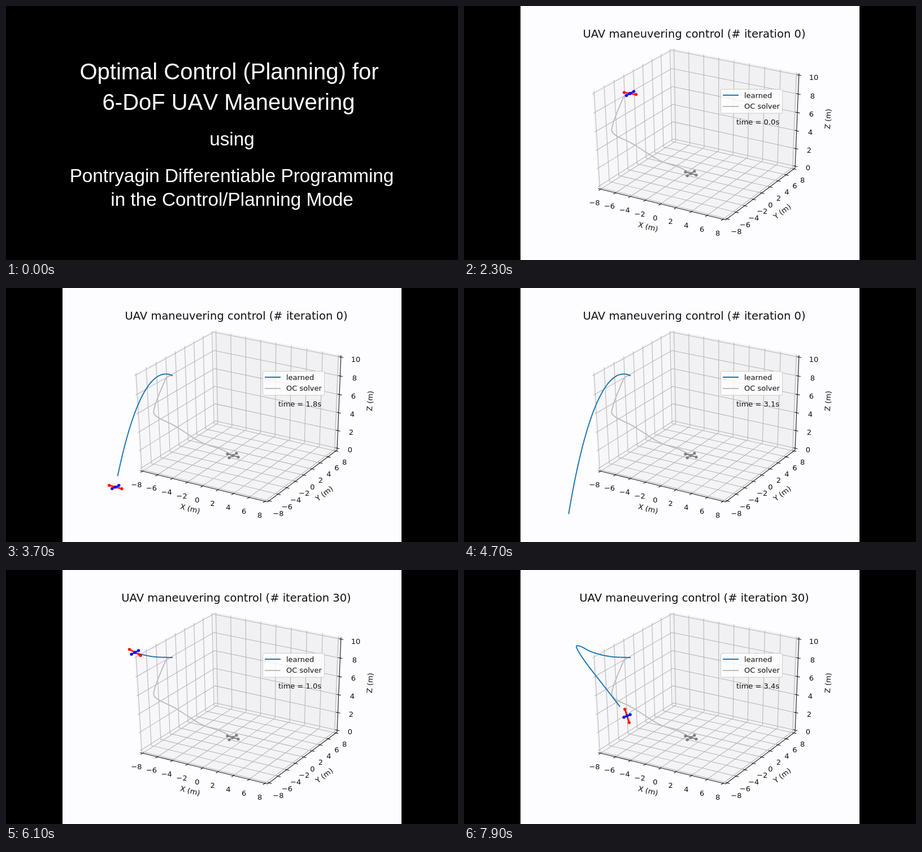
An HTML page for the animation above (8 s loop, 800x450 px).

```html
<!DOCTYPE html>
<html lang="en">
<head>
<meta charset="utf-8">
<title>UAV maneuvering</title>
<style>
  html, body { margin: 0; width: 100%; height: 100%; overflow: hidden; background: #000; }
  svg { display: block; width: 100vw; height: 100vh; }
  .slide { fill: #fff; font: 40px "Liberation Sans", Arial, sans-serif; text-anchor: middle; font-kerning: none; }
  .slide .mid { font-size: 33.3px; }
  .slide .note { font-size: 30px; font-style: italic; }
  .plot { font: 13px "DejaVu Sans", sans-serif; fill: #111; }
  .center { text-anchor: middle; }
  #title { font-size: 19.5px; }
  .grid { stroke: #b4b4b5; stroke-width: 1.04; fill: none; }
  .axis { stroke: #111; stroke-width: 1.04; fill: none; }
  .curve { fill: none; stroke-width: 1.95; stroke-linejoin: round; stroke-linecap: square; }
  .learned { stroke: #1f77b4; }
  .solver { stroke: #bdbdbe; }
  .drone line { stroke-width: 2.8; }
  .goal line { stroke-width: 2; }
</style>
</head>
<body>
<svg viewBox="0 0 800 450">
  <clipPath id="area"><rect x="175" y="54" width="465" height="346.5"/></clipPath>
  <rect width="800" height="450"/>

  <g id="intro" class="slide">
    <text x="395" y="130">Optimal Control (Planning) for</text>
    <text x="394" y="184">6-DoF UAV Maneuvering</text>
    <g class="mid">
      <text x="400" y="247">using</text>
      <text x="399.5" y="312">Pontryagin Differentiable Programming</text>
      <text x="400" y="354">in the Control/Planning Mode</text>
    </g>
  </g>

  <g id="case" class="slide">
    <text x="394.5" y="168.5">Case 1:</text>
    <g class="note">
      <text x="400.5" y="224.5">The policy is parameterized as</text>
      <text x="396.5" y="278.5">Lagrange polynomial of degree <tspan font-weight="bold">N = 5</tspan></text>
    </g>
  </g>

  <g id="plot" class="plot">
    <rect x="100" width="600" height="450" fill="#fdfcfe"/>
    <text id="title" class="center" x="407.5" y="55.5"></text>
    <g id="box"></g>
    <g id="labels" class="center">
      <text transform="translate(326 391) rotate(14)" y="4.7">X (m)</text>
      <text transform="translate(563 364) rotate(-37)" y="4.7">Y (m)</text>
      <text transform="translate(644 200) rotate(-87)" y="4.7">Z (m)</text>
    </g>
    <g clip-path="url(#area)">
      <path id="solver" class="curve solver"/>
      <g id="goal" class="goal"></g>
      <path id="learned" class="curve learned"/>
      <g id="drone" class="drone"></g>
    </g>
    <rect x="454.5" y="147.5" width="109" height="42.5" rx="2.5" fill="#fff" fill-opacity=".8" stroke="#ccc"/>
    <path class="curve learned" d="M459 158H485"/>
    <path class="curve solver" d="M459 178H485"/>
    <text x="496" y="163">learned</text>
    <text x="496" y="182">OC solver</text>
    <text id="clock" x="482" y="210"></text>
  </g>
</svg>
<script>
const $ = id => document.getElementById(id);
const LOOP = 8000, CASE_AT = 500, PLOT_AT = 2300, RETRAINED_AT = 5300;
const STEP = 200, SECONDS_PER_STEP = 0.26, TRAIL_LAG = 0.1;

function add(parent, tag, attrs, text = '') {
  const el = document.createElementNS('http://www.w3.org/2000/svg', tag);
  for (const key in attrs) el.setAttribute(key, attrs[key]);
  el.textContent = text;
  return parent.appendChild(el);
}

const toPath = points => 'M' + points.map(p => p.map(v => v.toFixed(2)).join(' ')).join('L');

// Perspective of the plot box; each coordinate runs from 0 to 1
function project(a, b, c) {
  const w = 1 - .04 * a + .07 * b - .048 * c;
  return [(237.5 + 207 * a + 159.1 * b - 21.3 * c) / w,
          (323.5 + 40.3 * a - 68.2 * b - 178.8 * c) / w];
}

function drawBox() {
  const box = $('box');
  const line = (kind, ...corners) =>
    add(box, 'path', { class: kind, d: toPath(corners.map(c => project(...c))) });
  const pane = (fill, ...corners) =>
    add(box, 'polygon', { fill, points: corners.map(c => project(...c)).join(' ') });
  const label = (value, x, y) =>
    add($('labels'), 'text', { x, y: y + 4.7 }, String(value).replace('-', '\u2212'));

  pane('#f7f6f8', [0, 0, 0], [0, 1, 0], [0, 1, 1], [0, 0, 1]);
  pane('#f1f0f2', [0, 1, 0], [1, 1, 0], [1, 1, 1], [0, 1, 1]);
  pane('#f4f3f5', [0, 0, 0], [1, 0, 0], [1, 1, 0], [0, 1, 0]);

  const ticks = n => Array.from({ length: n + 1 }, (_, i) => .02 + .96 * i / n);
  for (const s of ticks(8)) {
    line('grid', [s, 0, 0], [s, 1, 0], [s, 1, 1]);
    line('grid', [1, s, 0], [0, s, 0], [0, s, 1]);
  }
  for (const s of ticks(5)) line('grid', [0, 0, s], [0, 1, s], [1, 1, s]);

  line('axis', [0, 0, 0], [1, 0, 0], [1, 1, 0], [1, 1, 1]);
  ticks(8).forEach((s, i) => {
    line('axis', [s, .01, 0], [s, -.025, 0]);
    line('axis', [.99, s, 0], [1.02, s, 0]);
    label(2 * i - 8, 231 + 26.4 * i + .11 * i * i, 348 + 6.75 * i);
    label(2 * i - 8, 482 + 15.6 * i - .12 * i * i, 399 - 12.1 * i + .09 * i * i);
  });
  ticks(5).forEach((s, i) => {
    line('axis', [.985, 1, s], [1.018, 1, s]);
    label(2 * i, 609 + 2 * i, 286 - 31 * i - .2 * i * i);
  });
}

// Catmull-Rom curve; u counts key points
function spline(keys, u) {
  const last = keys.length - 1;
  const i = Math.min(Math.floor(u), last - 1), f = u - i;
  const p = keys[i], q = keys[i + 1];
  const before = keys[Math.max(i - 1, 0)], after = keys[Math.min(i + 2, last)];
  return p.map((v, k) => {
    const m = (q[k] - before[k]) / 2, n = (after[k] - v) / 2, d = q[k] - v;
    return v + f * (m + f * (3 * d - 2 * m - n + f * (m + n - 2 * d)));
  });
}

function trace(curve, end, count = 100) {
  return toPath(Array.from({ length: count + 1 }, (_, i) => curve(end * i / count)));
}

function drawDrone(group, [x, y], arms, r) {
  group.replaceChildren();
  for (const { length, angle, color } of arms) {
    const dx = length * Math.cos(angle * Math.PI / 180);
    const dy = length * Math.sin(angle * Math.PI / 180);
    add(group, 'line', { x1: x - dx, y1: y - dy, x2: x + dx, y2: y + dy, stroke: color });
    for (const s of [-1, 0, 1]) add(group, 'circle', { cx: x + s * dx, cy: y + s * dy, r, fill: color });
  }
}

const solverKeys = [[294, 155], [286, 157.5], [279, 169], [263, 211], [266, 227],
                    [300, 245], [345, 273], [380, 285.5], [401.5, 296.5]];
const detourKeys = [[294, 155], [260, 153.5], [228.3, 146], [206, 135.3],
                    [199.3, 137.5], [216, 164.5], [257, 217.5], [315, 293]];

// tilt: degrees per second of the red arm
const flights = [
  { iteration: 0, tilt: 3, path: t => [294 - 70 * t + 8.2 * t ** 2, 155 - 32 * t + 100 * t ** 2 - 12.5 * t ** 3] },
  { iteration: 30, tilt: 18.5, path: t => spline(detourKeys, t / .52) }
];

drawBox();
$('solver').setAttribute('d', trace(u => spline(solverKeys, u), solverKeys.length - 1));
drawDrone($('goal'), [401.5, 296.8], [
  { length: 9.9, angle: 16, color: '#808080' },
  { length: 7.5, angle: -32, color: '#808080' }
], 2.6);

function drawFlight({ iteration, tilt, path }, t) {
  $('title').textContent = `UAV maneuvering control (# iteration ${iteration})`;
  $('clock').textContent = `time = ${t.toFixed(1)}s`;
  $('learned').setAttribute('d', t > TRAIL_LAG ? trace(path, t - TRAIL_LAG) : '');
  drawDrone($('drone'), path(t), [
    { length: 10.7 + .5 * t, angle: 9.5 + tilt * t, color: '#fe1409' },
    { length: 7.5 - .45 * t, angle: 1.7 * t - 29, color: '#1510fd' }
  ], 2.7);
}

let shown;
function frame() {
  const now = performance.now() % LOOP;
  const scene = now < CASE_AT ? 'intro' : now < PLOT_AT ? 'case' : 'plot';
  const second = now >= RETRAINED_AT;
  const step = Math.floor((now - (second ? RETRAINED_AT : PLOT_AT)) / STEP);
  const state = [scene, second, step].join();
  if (shown !== state) {
    shown = state;
    for (const id of ['intro', 'case', 'plot']) $(id).style.display = id === scene ? '' : 'none';
    if (scene === 'plot') drawFlight(flights[+second], step * SECONDS_PER_STEP);
  }
  requestAnimationFrame(frame);
}
frame();
</script>
</body>
</html>
```
